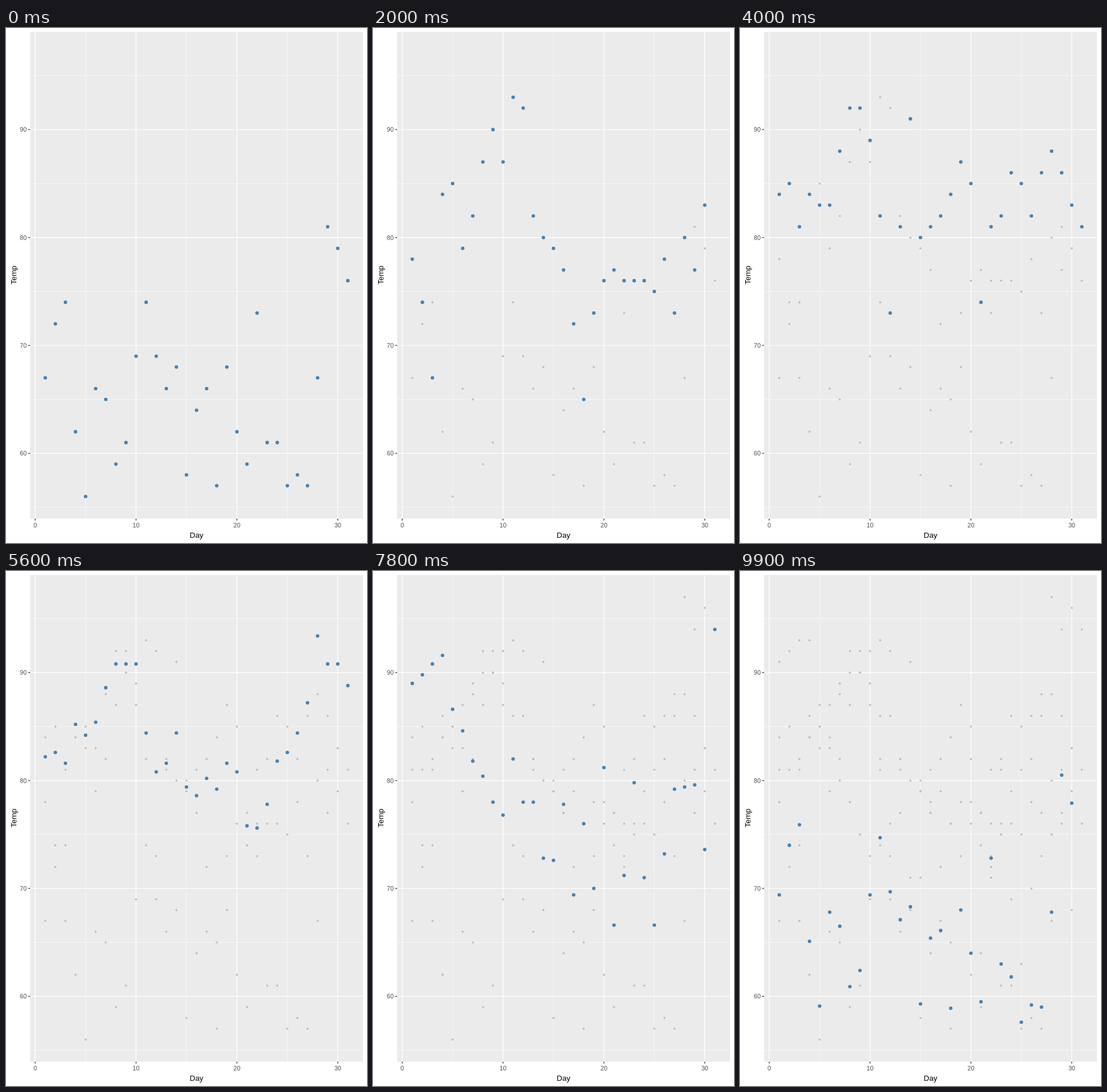
Animation, 626 px wide and 894 px high, one loop 10 s. Source, as an HTML page:

```html
<!DOCTYPE html>
<html lang="en">
<head>
<meta charset="utf-8">
<title>Daily temperature by month</title>
<style>
  html, body { margin: 0; width: 100%; height: 100%; overflow: hidden; background: #fff; }
  svg { display: block; width: 626px; height: 894px; font-family: "Liberation Sans", Arial, sans-serif; }
  .panel { fill: #ebebeb; }
  .major { stroke: #fff; stroke-width: 1.29; }
  .minor { stroke: #fff; stroke-width: .65; }
  .tick { stroke: #333; stroke-width: 1.29; }
  .label { fill: #4d4d4d; font-size: 10.64px; }
  .title { fill: #000; font-size: 13.3px; text-anchor: middle; }
  .mark { fill: #bebebe; }
  .point { fill: #4682b4; }
</style>
</head>
<body>
<svg viewBox="0 0 626 894"></svg>
<script>
const months = {
  may: '67 72 74 62 56 66 65 59 61 69 74 69 66 68 58 64 66 57 68 62 59 73 61 61 57 58 57 67 81 79 76',
  june: '78 74 67 84 85 79 82 87 90 87 93 92 82 80 79 77 72 65 73 76 77 76 76 76 75 78 73 80 77 83',
  july: '84 85 81 84 83 83 88 92 92 89 82 73 81 91 80 81 82 84 87 85 74 81 82 86 85 82 86 88 86 83 81',
  august: '81 81 82 86 85 87 89 90 90 92 86 86 82 80 79 77 79 76 78 78 77 72 75 79 81 86 88 97 94 96 94',
  september: '91 92 93 93 87 84 80 78 75 73 81 76 77 71 71 78 67 76 68 82 64 71 81 69 63 70 77 75 76 68'
};
const temps = Object.values(months).map(row => row.split(' ').map(Number));

const x = day => 50.6 + 17.49 * day;
const y = temp => 176.4 + 18.733 * (90 - temp);
const left = x(-0.5), right = x(32.5), top_ = y(99.05), bottom = y(53.95);
const tickLength = 3.3;

const svg = document.querySelector('svg');

function add(parent, tag, attrs, text) {
  const el = document.createElementNS('http://www.w3.org/2000/svg', tag);
  for (const key in attrs) el.setAttribute(key, attrs[key]);
  if (text !== undefined) el.textContent = text;
  return parent.appendChild(el);
}

const line = (cls, x1, y1, x2, y2) => add(svg, 'line', { class: cls, x1, y1, x2, y2 });
const column = (cls, day) => line(cls, x(day), top_, x(day), bottom);
const row = (cls, temp) => line(cls, left, y(temp), right, y(temp));

function drawChart() {
  add(svg, 'rect', { class: 'panel', x: left, y: top_, width: right - left, height: bottom - top_ });
  [55, 65, 75, 85, 95].forEach(t => row('minor', t));
  [5, 15, 25].forEach(d => column('minor', d));
  const majorTemps = [60, 70, 80, 90], majorDays = [0, 10, 20, 30];
  majorTemps.forEach(t => row('major', t));
  majorDays.forEach(d => column('major', d));

  for (const t of majorTemps) {
    line('tick', left - tickLength, y(t), left, y(t));
    add(svg, 'text', { class: 'label', x: 35.9, y: y(t) + 4, 'text-anchor': 'end' }, t);
  }
  for (const d of majorDays) {
    line('tick', x(d), bottom, x(d), bottom + tickLength);
    add(svg, 'text', { class: 'label', x: x(d), y: 866.5, 'text-anchor': 'middle' }, d);
  }
  add(svg, 'text', { class: 'title', x: (left + right) / 2, y: 884.5 }, 'Day');
  add(svg, 'text', { class: 'title', transform: 'translate(17.5 428.8) rotate(-90)' }, 'Temp');
}

drawChart();

// Trails left behind by each month
const trails = temps.map(list => {
  const group = add(svg, 'g', { class: 'mark' });
  list.forEach((t, i) => add(group, 'circle', { cx: x(i + 1), cy: y(t), r: 1.85 }));
  return group;
});

const points = temps[0].map((t, i) => add(svg, 'circle', { class: 'point', cx: x(i + 1), cy: y(t), r: 3.05 }));

// Each month rests for one second, then moves to the next in ten linear steps
function render(now) {
  const step = Math.floor(now / 100) % 100;
  const month = Math.floor(step / 20);
  const progress = Math.max(0, step % 20 - 10) / 10;
  const from = temps[month], to = temps[(month + 1) % temps.length];

  trails.forEach((group, i) => {
    const shown = i < month || (i === month && progress > 0);
    group.setAttribute('visibility', shown ? 'visible' : 'hidden');
  });

  points.forEach((point, i) => {
    const start = from[i], end = to[i] ?? start;
    point.setAttribute('visibility', start === undefined ? 'hidden' : 'visible');
    if (start !== undefined) point.setAttribute('cy', y(start + (end - start) * progress));
  });
}

function loop() {
  render(performance.now());
  requestAnimationFrame(loop);
}
loop();
</script>
</body>
</html>
```
